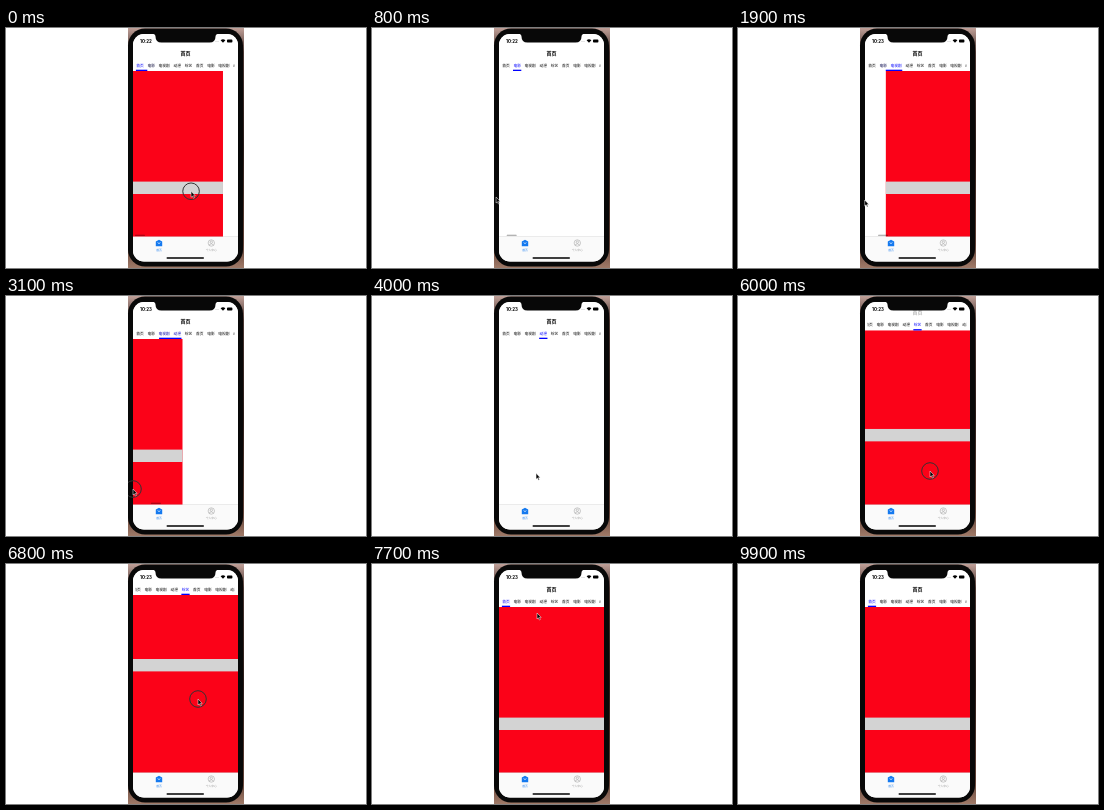
Animation of 360x240 px, one loop 10 s. Source, as an HTML page:

```html
<!DOCTYPE html>
<html lang="zh-CN">
<head>
<meta charset="utf-8">
<style>
html, body { margin: 0; width: 100%; height: 100%; overflow: hidden; background: #fff; }
svg { display: block; width: 360px; height: 240px; font-family: "Noto Sans CJK SC", "Noto Sans CJK", sans-serif; }
.latin { font-family: Inter, sans-serif; }
</style>
</head>
<body>
<svg viewBox="0 0 360 240">
  <defs>
    <linearGradient id="wall" x2="0" y2="1">
      <stop offset="0" stop-color="#c0a098"/>
      <stop offset=".1" stop-color="#4a3632"/>
      <stop offset=".5" stop-color="#2a1b18"/>
      <stop offset=".9" stop-color="#5f4036"/>
      <stop offset="1" stop-color="#a07a68"/>
    </linearGradient>
    <clipPath id="screen"><rect x="127" y="6" width="105" height="227.5" rx="11"/></clipPath>
    <clipPath id="strip"><rect x="129.5" y="18" width="99" height="26"/></clipPath>
    <clipPath id="shot"><rect x="122" width="116" height="240"/></clipPath>
  </defs>
  <rect x="122" width="116" height="240" fill="url(#wall)"/>
  <rect x="122" y=".5" width="115" height="238" rx="17" fill="#080808"/>
  <g clip-path="url(#screen)">
    <rect x="127" y="6" width="105" height="228" fill="#fff"/>
    <g id="pages"></g>
    <rect id="thumb" y="206.7" width="10" height="1" rx=".5" fill="#0006"/>
    <rect id="header" x="127" y="6" width="105" fill="#fff"/>
    <text id="title" x="179.5" font-size="5" font-weight="700" text-anchor="middle">首页</text>
    <g clip-path="url(#strip)"><g id="tabs" font-size="3.75" font-weight="500"></g></g>
    <text id="clock" class="latin" x="134" y="14.8" font-size="4.4" font-weight="700"></text>
    <g fill="#bbb"><circle cx="210" cy="13.6" r=".5"/><circle cx="212" cy="13.6" r=".5"/></g>
    <path d="M214.6 12.2Q217 10.2 219.4 12.2L217 14.8Z"/>
    <rect x="221" y="11.6" width="5.4" height="2.9" rx=".8"/>
    <rect x="127" y="208.8" width="105" height="26" fill="#fafafa"/>
    <rect x="127" y="208.6" width="105" height=".4" fill="#ccc"/>
    <path d="M149.8 213.4L153 211.8L156.2 213.4V218.2H149.8Z" fill="#1479ef"/>
    <path d="M151.6 214.6Q153 216.6 154.4 214.6" fill="none" stroke="#fff" stroke-width=".7"/>
    <g fill="none" stroke="#999" stroke-width=".5">
      <circle cx="205.3" cy="215" r="3.2"/><circle cx="205.3" cy="214.2" r="1.2"/>
      <path d="M203 217Q205.3 214.5 207.6 217"/>
    </g>
    <g font-size="2.8" text-anchor="middle">
      <text x="153" y="222.8" fill="#1479ef">首页</text>
      <text x="205.3" y="222.8" fill="#999">个人中心</text>
    </g>
    <rect x="160.5" y="229.3" width="37.5" height="1.4" rx=".7"/>
  </g>
  <path d="M146 5.5Q149.5 6 149.5 8.5Q149.5 14.5 155.5 14.5H203.5Q209.5 14.5 209.5 8.5Q209.5 6 213 5.5Z" fill="#080808"/>
  <g clip-path="url(#shot)"><g id="cursor">
    <circle id="ring" r="8.3" fill="none" stroke="#333"/>
    <path d="M0 0V6L1.4 4.8L2.4 7L3.4 6.5L2.4 4.4H4.2Z" stroke="#fff" stroke-width=".5"/>
  </g></g>
</svg>
<script>
const LOOP = 10000, WIDTH = 105, LEFT = 127, FOLD = 12;
const DRAG = 400, SCROLL = 5700, LIFT = 6900, TAP = 7250, LEAVE = 8200;
const $ = id => document.getElementById(id);
const set = (el, attrs) => { for (const k in attrs) el.setAttribute(k, attrs[k]); };
const add = (parent, tag, attrs, text = "") => {
  const el = document.createElementNS("http://www.w3.org/2000/svg", tag);
  set(el, attrs);
  el.textContent = text;
  return parent.appendChild(el);
};
const clamp = v => Math.min(1, Math.max(0, v));
const mix = (a, b, k) => a + (b - a) * k;
const ramp = (t, a, b) => clamp((t - a) / (b - a));
const smooth = (t, a, b) => { const k = ramp(t, a, b); return k * k * (3 - 2 * k); };
const out = (t, a, b) => 1 - (1 - ramp(t, a, b)) ** 3;

// Swipes to the next page: start time and height of the finger
const swipes = [[-108, 162], [1400, 165], [2700, 186], [4360, 164]];
const swipe = u => mix(.525 * ramp(u, 0, DRAG), 1, out(u, DRAG, 2 * DRAG));

// Cursor path as [time, x, y]
const path = [
  ...swipes.flatMap(([s, y]) => [[s, 198, y], [s + DRAG, 127, y + 7], [s + 900, 124, y + 7]]),
  [SCROLL, 192, 184], [6800, 192, 135], [TAP, 134, 37], [7700, 165, 49], [LEAVE, 182, 30]
];
function cursorAt(t) {
  const n = path.findIndex(([end]) => t < end);
  if (n < 0) return path.at(-1).slice(1);
  const [t0, x0, y0] = path[n - 1], [t1, x1, y1] = path[n], k = smooth(t, t0, t1);
  return [mix(x0, x1, k), mix(y0, y1, k)];
}

let x = 130.2;
const names = ["首页", "电影", "电视剧", "动漫", "综艺"];
const tabs = [...names, ...names].map(name => {
  const w = name.length * 3.75, tab = { x, w, el: add($("tabs"), "text", { x, y: 38.5 }, name) };
  x += w + 3.7;
  return tab;
});
const line = add($("tabs"), "rect", { y: 41.7, height: 1.3, fill: "#00f" });
const shift = tabs[4].x + tabs[4].w / 2 - 179.5;

const pages = [0, 2, 4].map(i => {
  const el = add($("pages"), "g", {});
  add(el, "rect", { y: 30, width: WIDTH, height: 180, fill: "#fb0218" });
  return { i, el, bar: add(el, "rect", { width: WIDTH, height: 12.4, fill: "#d3d3d3" }) };
});

function draw(t) {
  const back = 1 - smooth(t, TAP, TAP + 300);
  const p = back * swipes.reduce((sum, [s]) => sum + swipe(t - s), 0);
  const scroll = 46.5 * smooth(t, SCROLL, 6800) * back;
  const fold = Math.min(FOLD, scroll), i = Math.floor(p), k = p - i;

  for (const { i, el, bar } of pages) {
    set(el, { transform: `translate(${LEFT + (i - p) * WIDTH} 0)` });
    set(bar, { y: i == 4 ? 141.5 - scroll : 153.6 });
  }
  set($("header"), { height: 37 - fold });
  set($("title"), { y: 27 - fold, opacity: 1 - fold / FOLD });
  set($("tabs"), { transform: `translate(${-shift * smooth(t, 5100, 5400) * back} ${-fold})` });

  // The underline stretches to the next tab, then its tail catches up
  const a = tabs[i], b = tabs[i + 1];
  const from = mix(a.x, b.x, clamp(2 * k - 1)), to = mix(a.x + a.w, b.x + b.w, clamp(2 * k));
  set(line, { x: from - .4, width: to - from + .8 });
  tabs.forEach((tab, n) =>
    set(tab.el, { fill: `rgb(0 0 ${255 * clamp(1.4 * (1 - Math.abs(n - p)))})` }));

  const swiping = swipes.some(([s]) => t > s && t < s + 1000);
  set($("thumb"), { x: 128 + 6.7 * p, opacity: +swiping });
  $("clock").textContent = t < 1900 ? "10:22" : "10:23";

  const pressed = t > SCROLL && t < LIFT || t > TAP && t < TAP + 100
    || swipes.some(([s]) => t > s && t < s + DRAG + 30);
  set($("cursor"), { transform: `translate(${cursorAt(t)})`, opacity: +(t < LEAVE) });
  set($("ring"), { opacity: +pressed });
}

const start = performance.now();
function frame(now) {
  draw(Math.max(0, now - start) % LOOP);
  requestAnimationFrame(frame);
}
draw(0);
requestAnimationFrame(frame);
</script>
</body>
</html>
```
